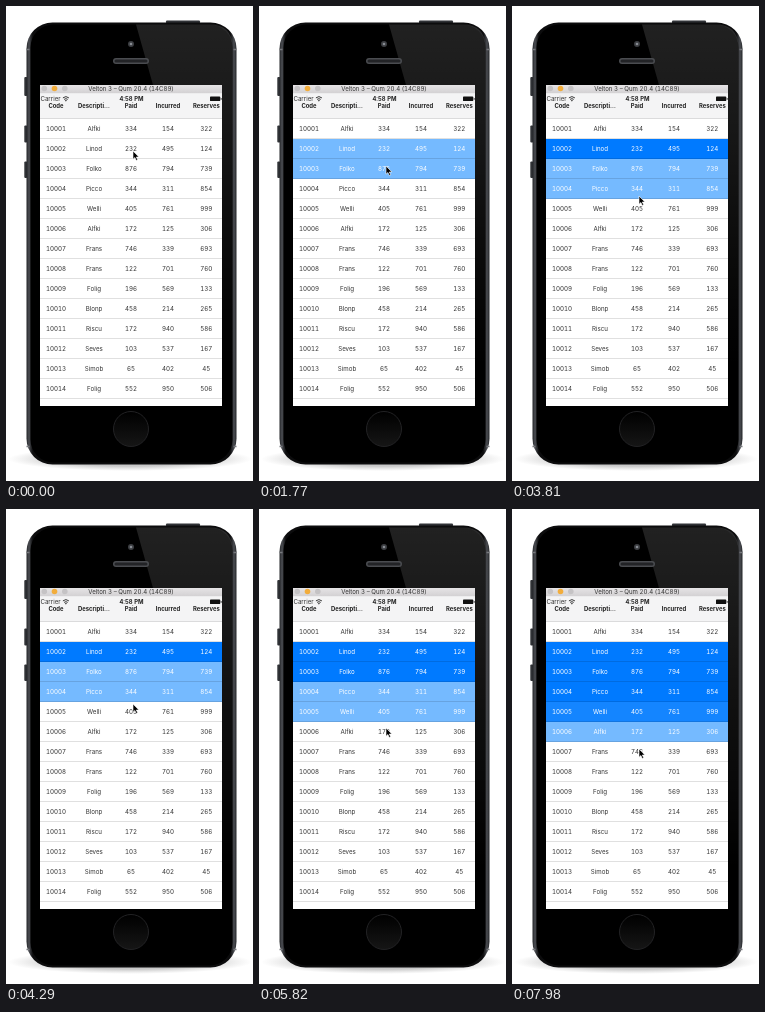
Animation of 247x475 px, one loop 8 s. Source, as an HTML page:

```html
<!DOCTYPE html>
<html lang="en">
<head>
<meta charset="utf-8">
<title>Row selection</title>
<style>
  html, body { margin: 0; width: 100%; height: 100%; overflow: hidden; background: #fff; }
  svg { display: block; width: 100vw; height: 100vh; font-family: Inter, "Liberation Sans", sans-serif; }
  text { text-anchor: middle; font-size: 6.2px; fill: #333; font-variant-numeric: tabular-nums; }
  .bold { font-weight: 700; font-size: 5.9px; fill: #222; }
  #table rect { shape-rendering: crispEdges; }
</style>
</head>
<body>
<svg viewBox="0 0 247 475">
  <defs>
    <linearGradient id="edge">
      <stop offset="0" stop-color="#232528"/>
      <stop offset=".012" stop-color="#4b4d52"/>
      <stop offset=".03" stop-color="#0c0c0d"/>
      <stop offset=".97" stop-color="#0c0c0d"/>
      <stop offset=".988" stop-color="#4b4d52"/>
      <stop offset="1" stop-color="#232528"/>
    </linearGradient>
    <linearGradient id="bar" x2="0" y2="1">
      <stop offset="0" stop-color="#e6e4e6"/>
      <stop offset="1" stop-color="#d2d0d2"/>
    </linearGradient>
    <linearGradient id="button" x2="0" y2="1">
      <stop offset="0" stop-color="#000"/>
      <stop offset="1" stop-color="#161616"/>
    </linearGradient>
    <linearGradient id="glare" x2="0" y2="1">
      <stop offset="0" stop-color="#fff" stop-opacity=".13"/>
      <stop offset="1" stop-color="#fff" stop-opacity="0"/>
    </linearGradient>
    <radialGradient id="shade">
      <stop offset=".6" stop-color="#777" stop-opacity=".4"/>
      <stop offset="1" stop-color="#999" stop-opacity="0"/>
    </radialGradient>
  </defs>

  <ellipse cx="124" cy="453" rx="122" ry="12" fill="url(#shade)"/>
  <g fill="#303236">
    <rect x="160" y="14.5" width="34" height="3" rx="1"/>
    <rect x="18.3" y="71" width="3" height="19" rx="1"/>
    <rect x="18.3" y="119.5" width="3" height="17" rx="1"/>
    <rect x="18.3" y="155.5" width="3" height="16.5" rx="1"/>
  </g>
  <rect x="20.5" y="16.5" width="210" height="442" rx="26" fill="url(#edge)"/>
  <path d="M20.5 43.5h3M227.5 43.5h3M20.5 440.5h3M227.5 440.5h3" stroke="#77797d" stroke-width="1.5"/>
  <rect x="24.5" y="18.5" width="202" height="438" rx="23" fill="#000"/>
  <path d="M130 18.5H203.500Q226.500 18.500 226.500 41.500V360H216V79H147Z" fill="url(#glare)"/>
  <circle cx="125" cy="38" r="3" fill="#3c3e42"/>
  <circle cx="125" cy="38" r="1.3" fill="#878b92"/>
  <rect x="107" y="52" width="36" height="6" rx="3" fill="#4a4c50"/>
  <rect x="108.500" y="53.500" width="33" height="3" rx="1.5" fill="#222326"/>
  <circle cx="125" cy="423" r="17.5" fill="url(#button)" stroke="#222224"/>

  <rect x="34" y="79" width="182" height="321" fill="#fff"/>
  <rect x="34" y="79" width="182" height="8.5" fill="url(#bar)"/>
  <circle cx="38.3" cy="82.5" r="2.8" fill="#c5c3c5"/>
  <circle cx="48.5" cy="82.5" r="2.8" fill="#f2ad3b"/>
  <circle cx="58.8" cy="82.5" r="2.8" fill="#c5c3c5"/>
  <text x="125" y="85" style="font-size:6.1px">Velton 3 – Qum 20.4 (14C89)</text>
  <rect x="34" y="87.5" width="182" height="25" fill="#f4f4f5"/>
  <text x="44.5" y="95.2" fill="#222">Carrier</text>
  <g fill="none" stroke="#222" stroke-width=".9">
    <path d="M56.9 91.9q3-2.6 6 0M58.1 93.4q1.8-1.5 3.6 0"/>
    <circle cx="59.9" cy="94.7" r=".4"/>
  </g>
  <text class="bold" x="125.5" y="95.2">4:58 PM</text>
  <rect x="204" y="90.5" width="10.2" height="4.6" rx=".7" fill="#111"/>
  <rect x="214.700" y="92" width=".8" height="1.8" fill="#111"/>

  <g id="table"></g>
  <path id="cursor" d="M0 0V8.2L1.9 6.5 3.3 9.5 4.7 8.8 3.3 6H5.9Z" fill="#000" stroke="#fff" stroke-width=".6"/>
</svg>
<script>
const LOOP = 8000, PITCH = 20.03, TOP = 112.6, FADE = 700;
const columns = [50, 88, 125, 162, 200.3];
const headings = ["Code", "Descripti…", "Paid", "Incurred", "Reserves"];
const records = `Alfki 334 154 322
Linod 232 495 124
Folko 876 794 739
Picco 344 311 854
Welli 405 761 999
Alfki 172 125 306
Frans 746 339 693
Frans 122 701 760
Folig 196 569 133
Blonp 458 214 265
Riscu 172 940 586
Seves 103 537 167
Simob 65 402 45
Folig 552 950 506`.split("\n");

// Per row: highlight start, highlight end, start of darkening (ms).
const selections = {
  1: [150, 240, 2820],
  2: [870, 1110, 4340],
  3: [2700, 2820, 6010],
  4: [4320, 4500, 7400],
  5: [5940, 6100, Infinity]
};
const cursorPath = [
  [0, 145], [420, 145], [720, 159.5], [1770, 160], [2100, 179],
  [3200, 179], [3480, 194], [3560, 194], [3780, 190], [3900, 190],
  [4290, 195], [4600, 199], [5250, 199], [5800, 219], [6690, 219],
  [6840, 236], [7050, 240], [LOOP, 240]
];
const WHITE = [255, 255, 255], LIGHT = [117, 186, 255], BLUE = [0, 122, 255], INK = [51, 51, 51];

const table = document.getElementById("table");
const cursor = document.getElementById("cursor");

function add(tag, attributes, content = "") {
  const node = document.createElementNS("http://www.w3.org/2000/svg", tag);
  for (const name in attributes) node.setAttribute(name, attributes[name]);
  node.textContent = content;
  return table.appendChild(node);
}

headings.forEach((label, i) => add("text", { x: columns[i], y: 102.2, class: "bold" }, label));

const rowTop = i => Math.round(TOP + i * PITCH);
const rows = records.map((record, i) => {
  const y = TOP + i * PITCH;
  const back = add("rect", { x: 34, y: rowTop(i), width: 182, height: rowTop(i + 1) - rowTop(i) });
  const cells = [10001 + i, ...record.split(" ")].map((value, c) =>
    add("text", { x: columns[c], y: y + 12.3 }, value));
  return { back, cells };
});
for (let i = 0; i <= rows.length; i++) {
  add("rect", { x: 34, y: rowTop(i) - 1, width: 182, height: 1, opacity: .12 });
}

const progress = (t, from, to) => t <= from ? 0 : Math.min(1, (t - from) / (to - from));
const mix = (a, b, k) => a.map((v, i) => v + (b[i] - v) * k);
const css = color => `rgb(${color.map(Math.round)})`;

function cursorY(t) {
  const next = cursorPath.findIndex(([time]) => time > t);
  const [t0, y0] = cursorPath[next - 1], [t1, y1] = cursorPath[next];
  const k = progress(t, t0, t1);
  return y0 + (y1 - y0) * k * k * (3 - 2 * k);
}

function draw(t) {
  rows.forEach(({ back, cells }, i) => {
    const [on, lit, fade] = selections[i] || Array(3).fill(Infinity);
    const glow = progress(t, on, lit);
    back.style.fill = css(mix(mix(WHITE, LIGHT, glow), BLUE, progress(t, fade, fade + FADE)));
    const ink = css(mix(INK, WHITE, glow));
    cells.forEach(cell => cell.style.fill = ink);
  });
  cursor.setAttribute("transform", `translate(127 ${cursorY(t)})`);
}

const start = performance.now();
function tick() {
  draw((performance.now() - start) % LOOP);
  requestAnimationFrame(tick);
}
tick();
</script>
</body>
</html>
```
